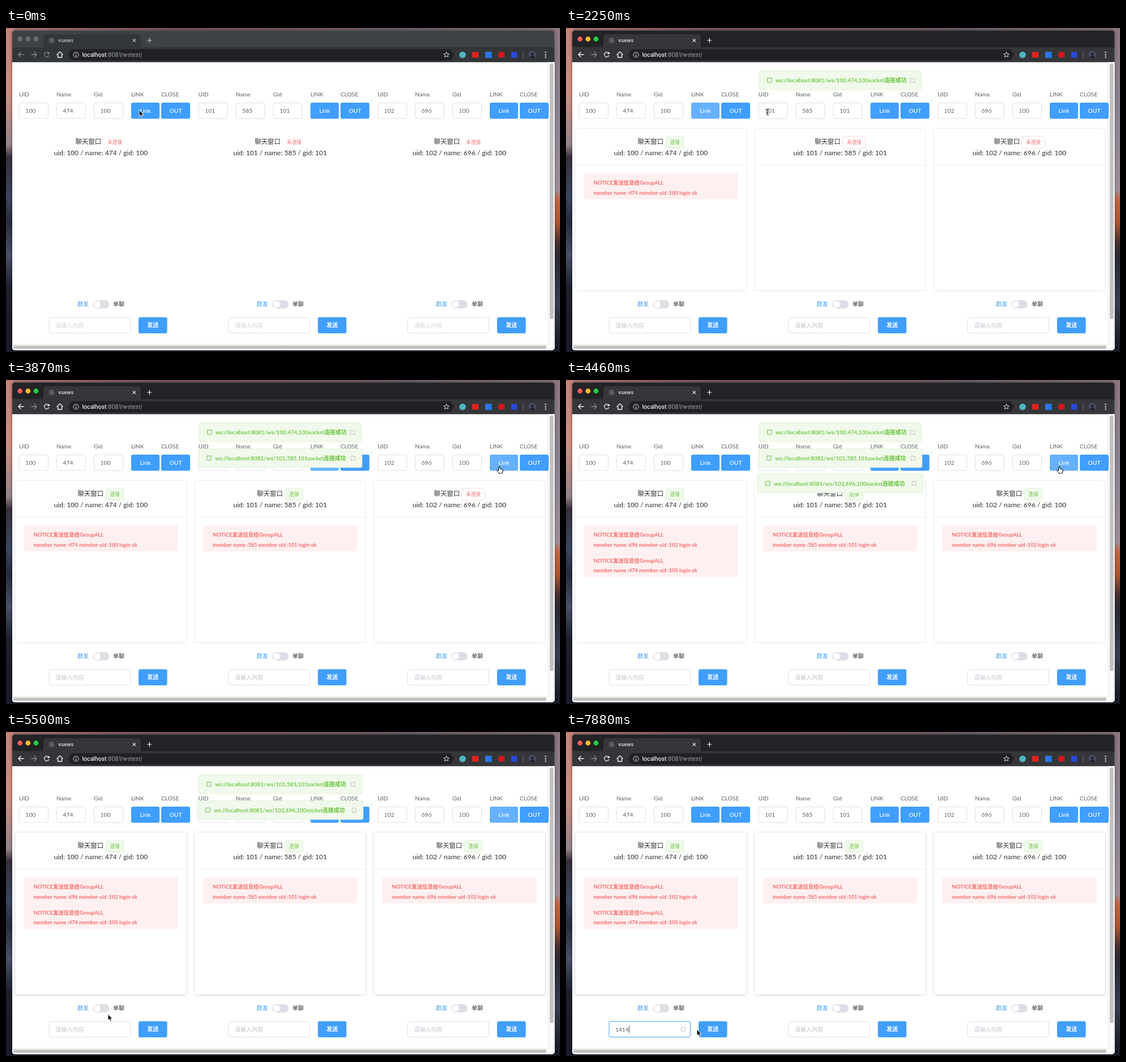
An HTML page with a canvas for the animation above (8000 ms loop, 978 px wide and 573 px high).

```html
<!DOCTYPE html>
<html lang="zh">
<head>
<meta charset="utf-8">
<title>vuews</title>
<style>
html, body { margin: 0; width: 100%; height: 100%; overflow: hidden; background: #212427; }
canvas { display: block; width: 978px; height: 573px; }
</style>
</head>
<body>
<canvas id="stage"></canvas>
<script>
const W = 978, H = 573, LOOP = 8000;
const canvas = document.getElementById('stage');
const scale = window.devicePixelRatio || 1;
canvas.width = W * scale;
canvas.height = H * scale;
const c = canvas.getContext('2d');

const UI = 'Lato, "Noto Sans CJK SC", "Noto Sans CJK", sans-serif';
const CHROME = 'Inter, sans-serif';
const BLUE = '#409eff', LIGHT = '#66b1ff', DARK = '#4690e8';
const COL = 316.5;

const users = [
  { uid: '100', name: '474', gid: '100', on: 1780 },
  { uid: '101', name: '585', gid: '101', on: 3100 },
  { uid: '102', name: '696', gid: '100', on: 4150 }
];
const toasts = [
  { user: users[0], x: 340.5, start: 1710, end: 4710 },
  { user: users[1], x: 339.5, start: 3390, end: 6410 },
  { user: users[2], x: 337.5, start: 4150, end: 7150 }
];
const keys = [6380, 6680, 7130, 7430], typed = '1414', FOCUS = 5930;

const bursts = [[600, 900, 3], [1650, 2690, 8], [2840, 3870, 8], [4020, 5050, 8],
  [5200, 6240, 8], [6390, 6840, 4], [7140, 7880, 6]];
const ticks = bursts.flatMap(([a, b, n]) =>
  Array.from({ length: n }, (_, i) => Math.round((a + (b - a) * i / (n - 1)) / 10) * 10));
const snap = t => ticks.reduce((last, s) => s <= t ? s : last, 0);

// Pointer path: time, x, y
const path = [[0, 235, 145], [600, 235, 145], [890, 240, 149], [1940, 240, 149], [2680, 562, 148],
  [3400, 562, 148], [3860, 871, 153], [4580, 871, 153], [5050, 480, 439], [5450, 180, 499],
  [5560, 180, 499], [5900, 140, 519], [7430, 140, 519], [7870, 231, 526]];

const clamp = v => Math.max(0, Math.min(1, v));
function ease(p) {
  p = clamp(p);
  if (p === 0 || p === 1) return p;
  let lo = 0, hi = 1, u = 0;
  for (let i = 0; i < 18; i++) {
    u = (lo + hi) / 2;
    const x = .75 * u * (1 - u) + u * u * u;
    if (x < p) lo = u; else hi = u;
  }
  return .3 * u * (1 - u) * (1 - u) + 3 * u * u * (1 - u) + u * u * u;
}

function rect(x, y, w, h, fill, r = 0, stroke) {
  c.beginPath();
  c.roundRect(x, y, w, h, r);
  if (fill) { c.fillStyle = fill; c.fill(); }
  if (stroke) { c.strokeStyle = stroke; c.lineWidth = 1; c.stroke(); }
}
function dot(x, y, r, fill) {
  c.beginPath();
  c.arc(x, y, r, 0, 7);
  c.fillStyle = fill;
  c.fill();
}
function ring(x, y, r, color, w = 1, a = 0, b = Math.PI * 2) {
  c.beginPath();
  c.arc(x, y, r, a, b);
  c.strokeStyle = color;
  c.lineWidth = w;
  c.stroke();
}
function line(color, w, ...p) {
  c.beginPath();
  for (let i = 0; i < p.length; i += 2) c.lineTo(p[i], p[i + 1]);
  c.strokeStyle = color;
  c.lineWidth = w;
  c.stroke();
}
function poly(fill, stroke, ...p) {
  c.beginPath();
  for (let i = 0; i < p.length; i += 2) c.lineTo(p[i], p[i + 1]);
  c.closePath();
  c.fillStyle = fill;
  c.fill();
  c.strokeStyle = stroke;
  c.lineWidth = 1;
  c.stroke();
}
// y is the visual middle of the line
function text(s, x, y, size, color, weight = 400, align = 'left', family = UI) {
  c.font = `${weight} ${size}px ${family}`;
  c.fillStyle = color;
  c.textAlign = align;
  c.fillText(s, x, y + size * .36);
  return c.measureText(s).width;
}
function ramp(x, y, w, h, vertical, stops) {
  const g = vertical ? c.createLinearGradient(0, y, 0, y + h) : c.createLinearGradient(x, 0, x + w, 0);
  stops.forEach(([p, color]) => g.addColorStop(p, color));
  rect(x, y, w, h, g);
}

function desktop() {
  rect(0, 0, W, H, '#20232e');
  ramp(0, 0, W, 12, false, [[0, '#b97a74'], [.3, '#7f5560'], [.7, '#77606f'], [1, '#8c7480']]);
  ramp(0, 0, 14, H, true, [[0, '#c4827a'], [.2, '#d08f80'], [.36, '#96828a'], [.4, '#352f3a'],
    [.52, '#3b4660'], [.6, '#262b3c'], [.7, '#4a5069'], [.8, '#1d202d'], [1, '#181a25']]);
  ramp(964, 0, 14, H, true, [[0, '#8f7480'], [.25, '#8b8496'], [.5, '#a08d9a'], [.53, '#c4633f'],
    [.6, '#b2552f'], [.66, '#4a3030'], [.72, '#272a3a'], [.85, '#3a4053'], [1, '#151720']]);
}

function browser(active) {
  c.save();
  c.shadowColor = 'rgba(0,0,0,.5)';
  c.shadowBlur = 5;
  rect(11, 4, 957.5, 566, '#fff', 5);
  c.restore();
  c.save();
  c.beginPath();
  c.roundRect(11, 4, 957.5, 566, 5);
  c.clip();
  const bar = active ? '#35363a' : '#323639';
  rect(11, 4, 958, 32, active ? '#212326' : '#3e4245');
  rect(11, 4, 958, 1, active ? '#4a4b4e' : '#5a5d60');
  rect(11, 34, 958, 26.5, bar);
  rect(66, 11, 172, 26, bar, [6, 6, 0, 0]);
  const lights = active ? ['#fc5b57', '#fdbc2e', '#2ac840'] : ['#6b6e71', '#6b6e71', '#6b6e71'];
  lights.forEach((color, i) => dot(24.7 + i * 14.2, 19.5, 4.4, color));

  dot(80.5, 22, 4.7, '#63666a');
  ring(80.5, 22, 2.4, '#47494d');
  text('vuews', 92, 22, 8.7, active ? '#f1f3f4' : '#d0d2d4', 500, 'left', CHROME);
  const ink = active ? '#f1f3f4' : '#c9cbcd', nav = active ? '#f1f3f4' : '#85888b';
  line(ink, 1.1, 223.7, 19.3, 229, 24.6);
  line(ink, 1.1, 229, 19.3, 223.7, 24.6);
  line(ink, 1.2, 249, 22, 257.5, 22);
  line(ink, 1.2, 253.2, 17.8, 253.2, 26.2);

  line(nav, 1.4, 31.5, 47, 22, 47);
  line(nav, 1.4, 26.3, 42.6, 22, 47, 26.3, 51.4);
  line('#85888b', 1.4, 44.5, 47, 54, 47);
  line('#85888b', 1.4, 49.7, 42.6, 54, 47, 49.7, 51.4);
  ring(72, 47, 4.1, nav, 1.4, .4, 5.5);
  poly(nav, nav, 76.3, 42.8, 76.3, 45.7, 73.4, 45.7);
  line('#f1f3f4', 1.4, 89.5, 47.5, 95, 42, 100.5, 47.5);
  line('#f1f3f4', 1.4, 91.5, 46.5, 91.5, 52, 98.5, 52, 98.5, 46.5);

  rect(110.5, 37.5, 679.5, 20, '#202124', 10);
  ring(123.5, 47.3, 4.6, '#dcdee0');
  line('#dcdee0', 1.1, 123.5, 46.5, 123.5, 50);
  line('#dcdee0', 1.1, 123.5, 44.5, 123.5, 45.6);
  const w = text('localhost', 134.5, 47.3, 9.9, '#fff', 500, 'left', CHROME);
  text(':8081/wstest/', 134.5 + w, 47.3, 9.9, '#a3a7ab', 400, 'left', CHROME);
  const star = [];
  for (let i = 0; i < 10; i++) {
    const a = i * Math.PI / 5 - Math.PI / 2, r = i % 2 ? 2.2 : 5;
    star.push(777.5 + r * Math.cos(a), 47.5 + r * Math.sin(a));
  }
  poly('#202124', '#dcdee0', ...star);

  dot(806, 47.5, 5.8, '#4cb8c4');
  rect(823, 42.5, 11, 10, '#e0251b');
  rect(846, 42, 11.5, 11, '#2478ee');
  dot(874.5, 47.5, 5.8, '#d9141e');
  rect(892, 42.5, 10, 10, '#2b49e0');
  line('#6b6e72', 1, 913, 41.5, 913, 53.5);
  rect(922.5, 41, 13.5, 13, '#4b4f66', 6);
  dot(929.3, 45.8, 2.4, '#20212b');
  rect(925.3, 48.6, 8, 5, '#20212b', [3, 3, 1, 1]);
  [43, 47.4, 51.8].forEach(y => dot(952.5, y, 1.2, '#f1f3f4'));

  rect(957, 60.5, 12, 510, '#fafafa');
  rect(11, 560, 958, 10, '#fafafa');
  line('#e9e9e9', 1, 957.5, 60.5, 957.5, 559.5, 11, 559.5);
  rect(960, 63, 6.5, 451.5, '#c1c1c1', 3);
  rect(13, 561.5, 941, 6, '#c1c1c1', 3);
  c.restore();
}

function button(x, y, w, label, color, size = 10.3, weight = 500) {
  rect(x, y, w, 28.5, color, 3);
  text(label, x + w / 2, y + 14.3, size, '#fff', weight, 'center');
}
function field(x, y, w, border = '#dcdfe6') {
  rect(x + .5, y + .5, w - 1, 27.5, '#fff', 3, border);
}

function linkColor(i, t) {
  const between = (a, b) => t >= a && t < b;
  if (i === 0) return between(1780, 2830) ? LIGHT : BLUE;
  if (i === 1) return between(2830, 3200) ? DARK : between(2660, 4010) ? LIGHT : BLUE;
  return between(4010, 4150) ? DARK : between(3850, FOCUS) ? LIGHT : BLUE;
}

function card(x, t) {
  const late = t >= 5190;
  if (t < 600) return;
  c.save();
  c.shadowColor = late ? 'rgba(0,0,0,.16)' : 'rgba(0,0,0,.05)';
  c.shadowBlur = (late ? 4 : 2) * scale;
  c.shadowOffsetY = scale;
  rect(x + 16.5, 177.5, 302, 287, '#fff', 3);
  c.restore();
  rect(x + 16.5, 177.5, 302, 287, '#fff', 3, '#ebeef5');
  line('#ebeef5', 1, x + 17, 242.5, x + 318, 242.5);
  line('#e1e3e8', 1, x + 27, 464.5, x + 308, 464.5);
}

function notice(x, y, u) {
  rect(x + 31.5, y, 272, 45.5, '#fef0f0', 3);
  text('NOTICE发送信息给GroupALL', x + 48.5, y + 16, 9.4, '#f56c6c', 700);
  text(`member name :${u.name} member uid :${u.uid} login ok`, x + 48.5, y + 34, 9.1, '#f56c6c', 700);
}

function panel(i, t) {
  const u = users[i], x = i * COL, on = t >= u.on, start = t < 600;
  ['UID', 'Name', 'Gid', 'LINK', 'CLOSE'].forEach((s, k) =>
    text(s, x + [23, 89, 155, 221, 274][k], 117.5, 10.2, '#606266'));
  [u.uid, u.name, u.gid].forEach((s, k) => {
    field(x + 23 + k * 66, 132, 52);
    text(s, x + 34.5 + k * 66, 146.5, 10.3, '#606266');
  });
  button(x + 221, 132, 50, 'Link', linkColor(i, t));
  button(x + 274, 132, 51, 'OUT', BLUE);

  card(x, t);
  text('聊天窗口', x + (on ? 126.5 : 122.5), 201, 11.4, '#303133');
  if (on) rect(x + 176.5, 191.5, 31.5, 21.5, '#f0f9eb', 3, '#e1f3d8');
  else if (!start) rect(x + 172, 191.5, 40.5, 21.5, '#fff', 3, '#fbdcdc');
  text(on ? '连接' : '未连接', x + 192.2, 202, 8.6, on ? '#67c23a' : '#f56c6c', 400, 'center');
  text(`uid: ${u.uid} / name: ${u.name} / gid: ${u.gid}`, x + 167.5, 221, 12.05, '#303133', 400, 'center');

  // Newest first; members of the same group hear about each other
  users.filter(m => on && t >= m.on && m.on >= u.on && m.gid === u.gid).reverse()
    .forEach((m, k) => notice(x, 257.5 + k * 45.7, m));

  text('群发', x + 126, 488.5, 10, BLUE, 500);
  rect(x + 153.5, 481.5, 28.5, 14.5, '#dcdfe6', 7.2);
  dot(x + 160.9, 488.7, 6, '#fff');
  text('单聊', x + 189, 488.5, 10, '#303133', 500);

  const focus = i === 0 && t >= FOCUS;
  const count = i === 0 ? keys.filter(k => t >= k).length : 0;
  field(x + 75.5, 511.5, 144.5, focus ? BLUE : '#dcdfe6');
  let end = 0;
  if (count) {
    end = text(typed.slice(0, count), x + 87, 526, 10.2, '#606266');
    rect(203.5, 522.5, 7, 6.5, null, 0, '#c0c4cc');
  } else {
    text('请输入内容', x + 87.5, 526, 10, start ? '#d0d3d9' : '#c0c4cc');
  }
  const last = count ? keys[count - 1] : FOCUS;
  if (focus && (t - last) % 1060 < 530) rect(x + 87.3 + end, 519.5, 1, 12.5, '#505255');
  button(x + 234, 511.5, 50.5, '发送', BLUE, 10, 600);
}

function toast(k, t) {
  const m = toasts[k];
  if (t < m.start || t >= m.end + 400) return;
  const into = t - m.start, out = t - m.end;
  const gone = toasts.slice(0, k).reduce((s, p) => s + ease((t - p.end) / 400), 0);
  const y = 75.5 + 45.8 * (k - gone) - 34 * (1 - ease(into / 400)) - 34 * ease(out / 400);
  const w = 2 * (484 - m.x);
  c.save();
  c.beginPath();
  c.rect(11, 60.5, 946, 499);
  c.clip();
  c.globalAlpha = ease(into / 300) * (1 - ease(out / 300));
  rect(m.x, y, w, 33.5, '#f0f9eb', 3, '#e1f3d8');
  rect(m.x + 15, y + 13, 7.5, 7.5, null, 0, '#67c23a');
  rect(m.x + w - 19.5, y + 13.5, 7, 7, null, 0, '#b9c8b2');
  text(`ws://localhost:8081/ws/${m.user.uid},${m.user.name},${m.user.gid}socket连接成功`,
    m.x + 29.5, y + 17, 9.9, '#67c23a', 600);
  c.restore();
}

function pointerAt(t) {
  const i = path.findIndex(p => p[0] > t);
  if (i < 0) return path[path.length - 1].slice(1);
  const [t0, x0, y0] = path[i - 1], [t1, x1, y1] = path[i];
  const p = (t - t0) / (t1 - t0), s = p * p * (3 - 2 * p);
  return [x0 + (x1 - x0) * s, y0 + (y1 - y0) * s];
}
function pointerKind(x, y, t) {
  if (t < 600) return 'arrow';
  const lx = x % COL, within = (a, b) => lx >= a && lx <= b;
  if (y >= 132 && y <= 160) {
    if (within(221, 271) || within(274, 325)) return 'hand';
    if (within(23, 75) || within(89, 141) || within(155, 207)) return 'beam';
  }
  if (y >= 512 && y <= 540) {
    if (within(76, 220)) return 'beam';
    if (within(234, 284)) return 'hand';
  }
  return 'arrow';
}
function pointer(t) {
  const [x, y] = pointerAt(t), kind = pointerKind(x, y, t);
  c.save();
  c.translate(x, y);
  c.lineJoin = 'round';
  if (kind === 'arrow') {
    poly('#000', '#fff', 0, 0, 0, 11, 2.5, 8.8, 4.3, 12.8, 6.2, 12, 4.5, 8.1, 7.8, 8);
  } else if (kind === 'hand') {
    poly('#fff', '#000', -1.2, .5, .6, .5, 1, 4, 3, 4.2, 5, 5, 6.3, 6, 6, 9,
      4.8, 12, -.8, 12, -2.5, 9.5, -4.5, 7, -3.4, 6, -1.4, 7.5);
  } else {
    const ink = '#202020';
    line(ink, 1, -2.5, -5.5, 0, -4.5, 2.5, -5.5);
    line(ink, 1, 0, -4.5, 0, 4.5);
    line(ink, 1, -2.5, 5.5, 0, 4.5, 2.5, 5.5);
    line(ink, 1, -1.5, 2, 1.5, 2);
  }
  c.restore();
}

function draw(now) {
  const t = snap(now % LOOP);
  c.setTransform(scale, 0, 0, scale, 0, 0);
  c.clearRect(0, 0, W, H);
  desktop();
  browser(t >= 600);
  users.forEach((_, i) => panel(i, t));
  toasts.forEach((_, k) => toast(k, t));
  pointer(t);
}

const begin = performance.now();
function tick() {
  draw(performance.now() - begin);
  requestAnimationFrame(tick);
}
tick();
</script>
</body>
</html>
```
